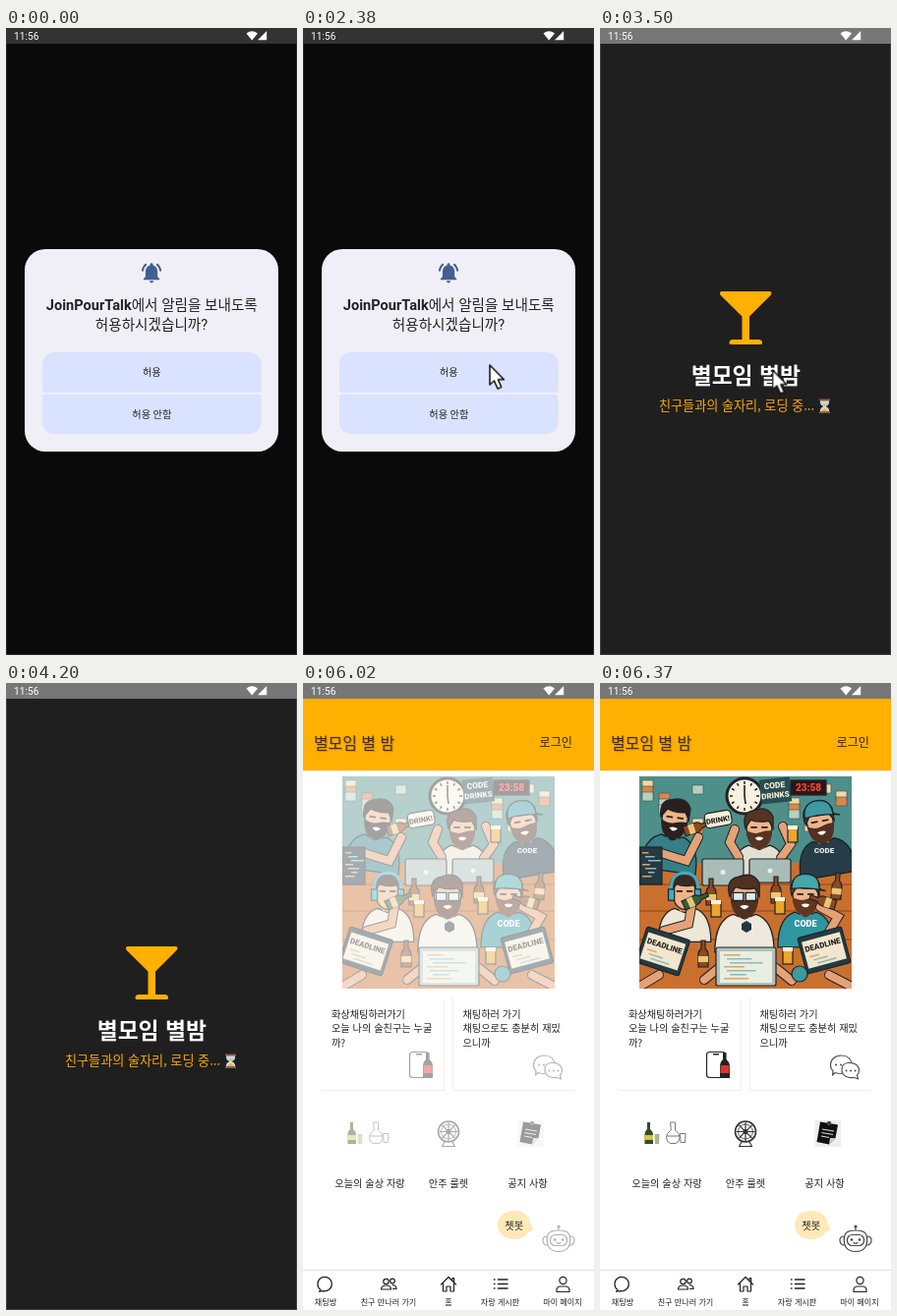
Write an HTML page that moves like this. It is 296x638 px and loops after 6.58 s.

```html
<!DOCTYPE html>
<html lang="ko">
<head>
<meta charset="utf-8">
<title>App start</title>
<style>
html, body { margin: 0; width: 100%; height: 100%; overflow: hidden; background: #0a0a0a; }
svg { display: block; width: 296px; height: 638px; }
text { font-family: Roboto, "Noto Sans CJK KR", "Noto Sans CJK JP", sans-serif; font-size: 10.2px; fill: #222; }
.ko text { font-family: "Noto Sans CJK KR", "Noto Sans CJK JP", "Noto Sans", sans-serif; }
.mid { text-anchor: middle; }
.bold { font-weight: 700; }
.medium { font-weight: 500; }
.line { fill: none; stroke: #222; stroke-width: 1.2; stroke-linecap: round; stroke-linejoin: round; }

#dialog, #splash, #home, #cursor, #media { animation: 6580ms step-end infinite; }
#dialog { animation-name: dialog; }
#splash { animation-name: splash; }
#home { animation-name: home; }
#media { animation-name: media; }
#cursor { animation-name: cursor; }

@keyframes dialog { 0% { visibility: visible } 53.19%, 100% { visibility: hidden } }
@keyframes splash { 0% { visibility: hidden } 53.19% { visibility: visible } 89.36%, 100% { visibility: hidden } }
@keyframes home { 0% { visibility: hidden } 89.36%, 100% { visibility: visible } }
@keyframes media {
  0% { opacity: 0 }
  90.42% { opacity: .2 }
  91.48% { opacity: .42 }
  92.55% { opacity: .64 }
  93.61% { opacity: .84 }
  94.68% { opacity: .94 }
  95.74%, 100% { opacity: 1 }
}
@keyframes cursor {
  0% { transform: translate(160px, 660px) }
  21.27% { transform: translate(163px, 562px) }
  22.34% { transform: translate(169px, 500px) }
  23.4% { transform: translate(175px, 447px) }
  24.46% { transform: translate(181px, 405px) }
  25.53% { transform: translate(186px, 374px) }
  26.59% { transform: translate(189px, 354px) }
  27.65% { transform: translate(191px, 344px) }
  28.72% { transform: translate(192px, 341px) }
  30.85% { transform: translate(191.5px, 341px) }
  31.91% { transform: translate(191px, 341.5px) }
  32.97% { transform: translate(190.5px, 342px) }
  34.04% { transform: translate(190px, 342.5px) }
  37.23% { transform: translate(187px, 343.5px) }
  38.29% { transform: translate(183px, 345px) }
  39.36% { transform: translate(179px, 346.5px) }
  40.42% { transform: translate(176.5px, 347px) }
  41.48% { transform: translate(175.5px, 347.5px) }
  60.63% { transform: translate(174px, 378px) }
  61.7% { transform: translate(176px, 466px) }
  62.76% { transform: translate(182px, 590px) }
  63.82%, 100% { transform: translate(184px, 660px) }
}
</style>
</head>
<body>
<svg viewBox="0 0 296 638">
  <g id="dialog">
    <path fill="#0a0a0a" d="M0 0H296V638H0z"/>
    <path fill="#333" d="M0 0H296V16H0z"/>
    <path fill="#242424" d="M0 16H1V638H0zM295 16H296V638H295zM0 637H296V638H0z"/>
    <rect x="19" y="225" width="258" height="206" rx="21" fill="#f0eff7"/>
    <path fill="#435e91" transform="translate(135.8 236.8) scale(1.02)" d="M7.58 4.08L6.15 2.65C3.75 4.48 2.17 7.3 2.03 10.5h2c.15-2.65 1.51-4.97 3.55-6.42zm12.39 6.42h2c-.15-3.2-1.73-6.02-4.12-7.85l-1.42 1.43c2.02 1.45 3.39 3.77 3.54 6.42zM18 11c0-3.07-1.64-5.64-4.5-6.32V4c0-.83-.67-1.5-1.5-1.5s-1.5.67-1.5 1.5v.68C7.63 5.36 6 7.92 6 11v5l-2 2v1h16v-1l-2-2v-5zm-6 11c1.1 0 2-.9 2-2h-4c0 1.1.9 2 2 2z"/>
    <g class="mid">
      <text x="148.3" y="286.5" style="font-size:14.6px"><tspan class="bold">JoinPourTalk</tspan>에서 알림을 보내도록</text>
      <text x="148" y="307" style="font-size:14.6px">허용하시겠습니까?</text>
      <path fill="#d9e2ff" d="M49 330H247.500a12 12 0 0 1 12 12V368a3 3 0 0 1-3 3H40a3 3 0 0 1-3-3V342a12 12 0 0 1 12-12z"/>
      <path fill="#d9e2ff" d="M40 373H256.500a3 3 0 0 1 3 3V401a12 12 0 0 1-12 12H49a12 12 0 0 1-12-12V376a3 3 0 0 1 3-3z"/>
      <text x="148.300" y="354.300">허용</text>
      <text x="148.300" y="397.300">허용 안함</text>
    </g>
  </g>

  <g id="splash" class="ko">
    <path fill="#1f1f1f" d="M0 0H296V638H0z"/>
    <path fill="#777" d="M0 0H296V16H0z"/>
    <path fill="#3c3c3c" d="M0 16H1V638H0zM295 16H296V638H295zM0 637H296V638H0z"/>
    <path fill="#ffb000" d="M124 268H172.500c2 0 2.600 2.400 1 4L152 293.500V317H161.500a3.500 3.500 0 0 1 3.500 3.500q0 1.500-1.500 1.500H133q-1.500 0-1.500-1.500a3.500 3.500 0 0 1 3.500-3.500H144.500V293.500L122.800 272c-1.600-1.600-.8-4 1.200-4z"/>
    <text class="mid bold" x="148.300" y="362" style="font-size:22.800px;fill:#fff">별모임 별밤</text>
    <text x="60" y="389" style="font-size:13.100px;fill:#f8a806">친구들과의 술자리, 로딩 중...</text>
    <path fill="#c5dce4" d="M224 379H233V381.500Q233 383.500 229.800 385Q233 386.500 233 388.500V391H224V388.500Q224 386.500 227.200 385Q224 383.500 224 381.500z"/>
    <path fill="#f2b53a" d="M225.500 382.500H231.500L228.500 385zM225 390.500Q225.500 388 228.500 387Q231.500 388 232 390.500z"/>
    <path fill="#8a5b45" d="M223 377.500H234V379.500H223zM223 390H234V392H223z"/>
  </g>

  <g id="home" class="ko">
    <path fill="#fff" d="M0 0H296V638H0z"/>
    <path fill="#777" d="M0 0H296V16H0z"/>
    <path fill="#ffb000" d="M0 16H296V89H0z"/>
    <path fill="#eee" d="M0 89H296V90H0z"/>
    <text class="medium" x="11" y="67" style="font-size:15.900px;fill:#432d2e;text-shadow:1px 1px 1px #8a600080">별모임 별 밤</text>
    <text class="medium" x="240.600" y="65" style="font-size:12.100px;fill:#33230c">로그인</text>

    <path fill="none" stroke="#efefef" d="M143.500 322V414.500H19M152.500 320V414.500H276"/>
    <g class="medium">
      <text x="29" y="341">화상채팅하러가기</text>
      <text x="162.500" y="341">채팅하러 가기</text>
    </g>
    <text x="29" y="355">오늘 나의 술친구는 누굴</text>
    <text x="29" y="369.500">까?</text>
    <text x="162.500" y="355">채팅으로도 충분히 재밌</text>
    <text x="162.500" y="369.500">으니까</text>
    <g class="mid">
      <text x="68" y="513" fill="#444">오늘의 술상 자랑</text>
      <text x="148" y="513">안주 룰렛</text>
      <text x="228.500" y="513">공지 사항</text>
    </g>

    <path fill="#ffe9b8" d="M215 537C225 537 231 543 231.500 550L234.500 556.500 229 559C226 564 221 566 215 566C205 566 198 560 198 551.500S205 537 215 537z"/>
    <text class="mid" x="214.700" y="555.700">쳇봇</text>

    <path fill="#e2e2e2" d="M0 597H296V598H0z"/>
    <g class="line">
      <path d="M18 617.500A7.200 7.200 0 1 1 21 618.700L16.500 619.200z"/>
      <circle cx="84.500" cy="609" r="2.700"/><circle cx="91" cy="608.500" r="2.300"/>
      <path d="M79.500 617Q79.500 613 84.500 613T89.500 617zM91 612.500Q95 612.500 95 616.500H91.500"/>
      <path d="M140.500 612L148 604.500 155.500 612M142.500 611V619H146V614H150V619H153.500V611M152 608V605.500H153.700V610"/>
      <path stroke-width="1.500" d="M198.500 607H208M198.500 611.500H208M198.500 616H208M194.500 607h.5M194.500 611.500h.5M194.500 616h.5"/>
      <circle cx="264.500" cy="608" r="3.600"/>
      <path d="M258 619.500V618Q258 614 262 614H267Q271 614 271 618V619.500z"/>
    </g>
    <g class="mid" id="tabs"></g>

    <g id="media">
      <svg id="party" x="40" y="95" width="216" height="216" viewBox="0 0 216 216"></svg>

      <rect class="line" x="108.500" y="375.500" width="19" height="26" rx="3"/>
      <path fill="#222" d="M115 377H121V378.500H115zM125 376H128.500V383Q132 386 132 389V402H122V389Q122 386 125 383z"/>
      <path fill="#d8342f" d="M122.500 389H131.500V397H122.500z"/>

      <g class="line" style="stroke:#555">
        <path fill="#fff" d="M239 396.500L236.500 399 237 394.500Q234.500 392.500 234.500 388.500C234.500 383 239 379 245.500 379S256 383 256 388 251 397.500 245 397.500Q242 397.500 239 396.500z"/>
        <path fill="#fff" d="M252 386.500C258 385.500 263.500 389 263.500 394Q263.500 397 261.500 399L262.500 403 258 401.300C252 402.500 246.500 399.500 246 394.500S248.500 387 252 386.500z"/>
        <path stroke-width="2" d="M240 388.500h.1M245 388.500h.1M250.500 394.500h.1M255 394.500h.1M259.500 394.500h.1"/>
      </g>

      <path fill="#354a2c" d="M48 447H51V454Q54 456 54 459V469H45.500V459Q45.500 456 48 454z"/>
      <path fill="#d9c34a" d="M45.500 460H54V465H45.500z"/>
      <path fill="#a9b58d" d="M55.500 459H60.500L60 469H56z"/>
      <g class="line" style="stroke:#777;stroke-width:1">
        <path d="M72 447H76.500V455Q81 458 81 462.500T77 468.500H71.500Q67.500 467 67.500 462.500T72 455zM68 461H80.500M82 458.500H87L86.500 467.500H82.500z"/>
      </g>

      <g class="line" style="stroke:#333" id="wheel">
        <circle cx="148" cy="456.500" r="10.500" stroke-width="1.600"/>
        <circle cx="148" cy="456.500" r="7.500" stroke-width=".8"/>
        <circle cx="148" cy="456.500" r="2" fill="#333"/>
        <path d="M144 467L141.500 471.500H154.500L152 467"/>
      </g>

      <path fill="#eee" d="M218.500 445H245V472H218.500z"/>
      <path fill="#111" d="M224 446.500L242 449.500 239.500 463 233 469.500 220.500 467z"/>
      <path stroke="#ddd" d="M226 454L238 456M225.500 457.500L237 459.500M225 461L233 462.500"/>
      <path fill="#ccc" d="M233 469.500L234 463 239.500 463z"/>
      <circle cx="233" cy="448" r="2.200" fill="#444"/>

      <g class="line" style="stroke:#444">
        <path d="M260 557V553.500M249 562Q250 557 260 557T271 562M248.500 563Q243.500 563 244 567.500T248.500 572M271.500 563Q276.500 563 276 567.500T271.500 572M249 562Q247 568 250 574Q253 578.500 260 578.500T270 574Q273 568 271 562"/>
        <rect x="251.500" y="561.500" width="17" height="11" rx="5"/>
        <path stroke-width="2.600" d="M256 566.500h.1M264 566.500h.1"/>
        <path d="M258 569.500Q260 571 262 569.500"/>
        <circle cx="260" cy="553" r="1"/>
      </g>
    </g>
  </g>

  <g fill="#fff">
    <text x="8" y="11.800" style="fill:#fff">11:56</text>
    <path d="M244.500 5.500Q250.200 1 256 5.500L250.200 12.500zM265.200 3V12.300H256z"/>
  </g>

  <path id="cursor" fill="#fff" stroke="#111" stroke-width="1.500" stroke-linejoin="round" d="M0 .5V20.500L4.500 16.500 8 24.500 11.800 22.900 8.400 15.200H14.400z"/>
</svg>

<script>
const $ = id => document.getElementById(id);
const rect = (x, y, w, h, fill, more = "") => `<rect x="${x}" y="${y}" width="${w}" height="${h}" fill="${fill}" ${more}/>`;
const path = (d, fill, more = "") => `<path d="${d}" fill="${fill}" ${more}/>`;
const disc = (x, y, r, fill, more = "") => `<circle cx="${x}" cy="${y}" r="${r}" fill="${fill}" ${more}/>`;
const at = (x, y, turn, scale, body) => `<g transform="translate(${x} ${y}) rotate(${turn}) scale(${scale})">${body}</g>`;
const word = (x, y, size, fill, s) => `<text x="${x}" y="${y}" text-anchor="middle" style="font:800 ${size}px Roboto,sans-serif;fill:${fill}">${s}</text>`;
const ink = 'stroke="#1b2429" stroke-width="1.2"';

$("tabs").innerHTML = [[23, "채팅방"], [87, "친구 만나러 가기"], [148, "홈"], [200.5, "자랑 게시판"], [264, "마이 페이지"]]
  .map(([x, s]) => `<text x="${x}" y="633" style="font-size:8.1px">${s}</text>`).join("");

let spokes = "";
for (let i = 0; i < 8; i++) {
  const a = i * Math.PI / 4, c = Math.cos(a), s = Math.sin(a);
  spokes += `M${148 + 2 * c} ${456.5 + 2 * s}L${148 + 9 * c} ${456.5 + 9 * s}`;
}
$("wheel").innerHTML += path(spokes, "none");

function person(x, y, scale, o) {
  return at(x, y, o.turn || 0, scale,
    path("M-26 48Q-26 20-10 15L0 19 10 15Q26 20 26 48z", o.shirt, ink) +
    rect(-5, 8, 10, 10, "#d98d62") +
    path("M-12-4Q-12-15 0-15T12-4Q12 14 0 16Q-12 14-12-4z", "#efb58a", ink) +
    (o.beard ? path("M-12 1Q-5 5 0 3T12 1Q12 16 0 19Q-12 16-12 1z", o.hair) : "") +
    path("M-13-1Q-17-16-5-18Q8-23 13-12L13-1 9-8Q0-6-8-9z", o.hair, ink) +
    (o.cap ? path("M-13-7Q-13-21 0-21T13-7L19-5Q2-9-13-7z", o.cap, ink) : "") +
    path("M-8-2H-2M2-2H8", "none", 'stroke="#25201e" stroke-width="1.6"') +
    (o.glasses ? path("M-10-4H-1V3H-10zM1-4H10V3H1z", "#dcecea", ink) : "") +
    (o.phones ? path("M-13 0Q-15-20 0-20T13 0", "none", 'stroke="#43a9c0" stroke-width="3"') + rect(-16, -4, 6, 11, "#43a9c0", ink) + rect(10, -4, 6, 11, "#43a9c0", ink) : "") +
    path("M-4 8Q0 6 4 8Q0 13-4 8z", o.beard ? "#fff" : "#9b4235"));
}
const arm = (d, color) => path(d, "none", 'stroke="#1b2429" stroke-width="10" stroke-linecap="round"') +
  path(d, "none", `stroke="${color}" stroke-width="8" stroke-linecap="round"`);
const bottle = (x, y, turn, color = "#8d4a1d") => at(x, y, turn, 1,
  path("M-2-14H2V-6Q5-3 5 0V13H-5V0Q-5-3-2-6z", color, ink) + rect(-5, 2, 10, 6, "#e8c67c"));
const glass = (x, y) => rect(x - 5, y - 7, 10, 15, "#eda42d", ink) + rect(x - 5, y - 9, 10, 4, "#fff3d8");
const laptop = (x, y, w, h) => rect(x, y, w, h, "#a9bcb8", ink + ' rx="2"') + disc(x + w / 2, y + h / 2, 2.5, "#e5efec");

function code(x, y, w, rows) {
  let out = "";
  for (let i = 0; i < rows; i++)
    out += rect(x + i % 3 * 3, y + i * 4, w * (.4 + (i * 7 % 5) / 10), 1.5, i % 3 ? "#8eb9b8" : "#e2a45d");
  return out;
}

function notes() {
  let out = "";
  for (let i = 0; i < 22; i++) {
    const x = i < 12 ? i % 4 * 17 + 3 : 152 + i % 4 * 16;
    out += rect(x, 4 + (i * 13 % 46), 11, 9, ["#eed9a8", "#d9874a", "#b8d0bd"][i % 3], 'stroke="#36504e" stroke-width=".6"');
  }
  return out;
}

const deadline = (x, y, turn) => at(x, y, turn, 1,
  rect(-23, -19, 46, 38, "#243b43", ink + ' rx="2"') + rect(-20, -14, 40, 28, "#f2e6cc") +
  word(0, -3, 8, "#222", "DEADLINE") + code(-16, 2, 25, 3));

let ticks = "";
for (let i = 0; i < 12; i++)
  ticks += `<path d="M0-12V-15" stroke="#222" stroke-width="1.5" transform="rotate(${i * 30})"/>`;

$("party").innerHTML =
  rect(0, 0, 216, 216, "#4f8f89") + notes() +
  rect(0, 88, 216, 128, "#c9702f") +
  path("M0 110H216M0 137H216M0 166H216", "none", 'stroke="#8b431f"') +
  at(107, 20, 0, 1, disc(0, 0, 18, "#f8f1df", 'stroke="#222" stroke-width="3"') + ticks + path("M0-11V0L1 8", "none", 'stroke="#222" stroke-width="1.6"')) +
  at(138, 15, -6, 1, rect(-15, -13, 31, 25, "#284d52") + word(0, -3, 8.5, "#f8edd1", "CODE") + word(0, 7, 8, "#f8edd1", "DRINKS")) +
  rect(154, 4, 36, 15, "#2a1718", ink) + word(172, 15, 10, "#ff4136", "23:58") +
  person(36, 44, 1.1, { shirt: "#347f88", hair: "#29201f", beard: true, turn: 8 }) +
  arm("M22 78L48 86 60 62", "#e5a276") + bottle(58, 52, 72) +
  at(80, 45, -10, 1, rect(-13, -9, 27, 15, "#f7efd9", ink + ' rx="4"') + word(0, 2, 7.5, "#222", "DRINK!")) +
  person(122, 54, 1.08, { shirt: "#e4dfd0", hair: "#573322", beard: true }) +
  arm("M101 82L92 67 97 54", "#e5a276") + arm("M144 83L154 69 146 51", "#e5a276") +
  person(184, 48, 1.12, { shirt: "#263c48", hair: "#523022", beard: true, cap: "#3f98a4", turn: -10 }) +
  word(188, 78, 8, "#e8efe7", "CODE") + glass(156, 59) +
  laptop(64, 84, 42, 27) + laptop(112, 84, 42, 24) + rect(0, 72, 23, 38, "#263a42", ink) + code(3, 77, 16, 7) +
  bottle(73, 118, 0) + glass(78, 135) + bottle(139, 116, 0) + glass(143, 132) + bottle(201, 112, 5) +
  person(46, 119, 1.03, { shirt: "#eee7d6", hair: "#3d2922", phones: true }) +
  arm("M25 157L50 150 53 133", "#e5a276") + bottle(57, 126, 65, "#365d36") +
  person(169, 122, 1.08, { shirt: "#2f96a0", hair: "#64351f", beard: true, cap: "#44a7a9" }) +
  word(169, 153, 9, "#fff", "CODE") + arm("M193 158L202 143 184 133", "#e5a276") + bottle(187, 127, -72) +
  person(107, 123, 1.16, { shirt: "#eee9dc", hair: "#50301f", beard: true, glasses: true }) +
  path("M104 150L109 147 114 150V156L109 159 104 156z", "#273640") +
  deadline(24, 178, 18) + deadline(188, 177, -15) +
  arm("M66 207L82 194", "#e5a276") + arm("M155 208L139 195", "#e5a276") +
  rect(78, 174, 61, 39, "#b1c0b9", ink + ' rx="2"') + rect(82, 178, 53, 32, "#e8eee0") + code(86, 181, 42, 7) +
  arm("M0 214L20 202", "#e5a276") + arm("M216 214L193 202", "#e5a276") +
  bottle(65, 181, 0) + glass(151, 183) + disc(163, 201, 8, "#3b99a0", ink);
</script>
</body>
</html>
```
